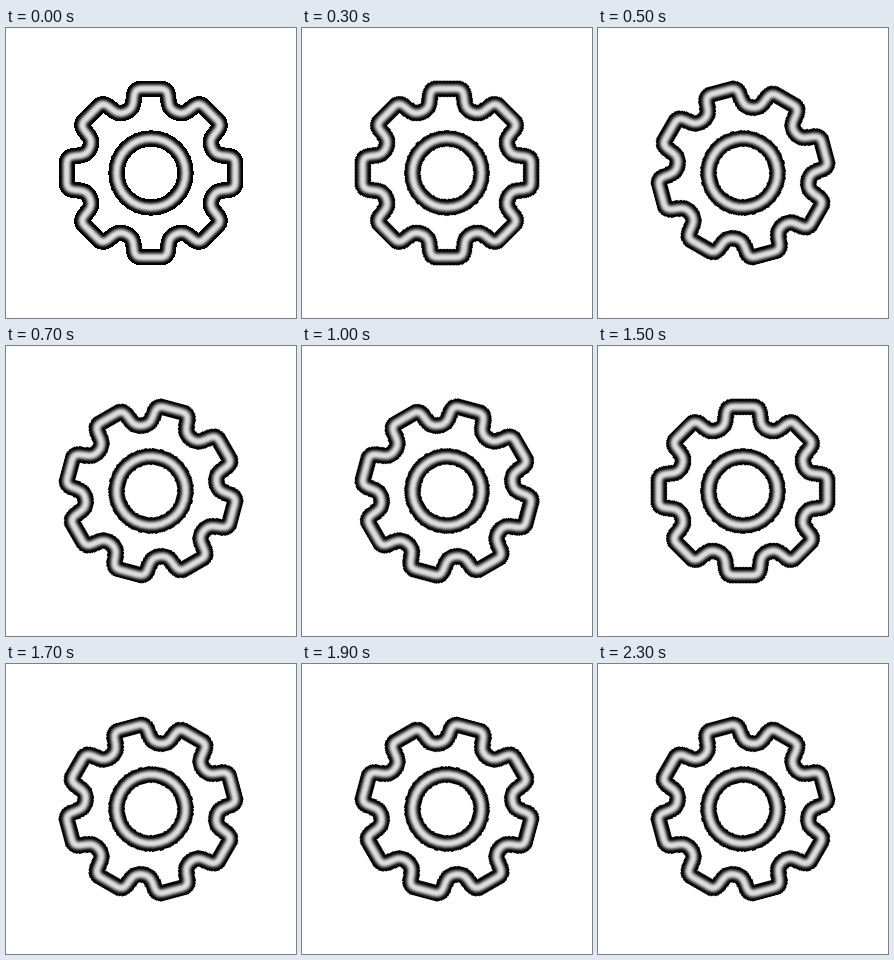
Recreate the animation shown at these times as an HTML page. Size 290 by 290 pixels, loop 2400 ms.

```html
<!DOCTYPE html>
<html lang="en">
<head>
<meta charset="utf-8">
<title>Turning gear</title>
<style>
  html, body { margin: 0; width: 100%; height: 100%; overflow: hidden; background: #fff; }
  svg { display: block; width: 100vw; height: 100vh; }
  #gear { animation: turn 2400ms steps(24) infinite; transform-origin: 0 0; }
  #layers { fill: none; stroke-linejoin: round; }
  @keyframes turn { from { transform: rotate(0deg); } to { transform: rotate(360deg); } }
</style>
</head>
<body>
<svg viewBox="-145 -145 290 290">
  <clipPath id="box"><rect x="-91.5" y="-91.5" width="183" height="183"/></clipPath>
  <g id="gear"><g id="layers" clip-path="url(#box)"></g></g>
</svg>
<script>
  const TEETH = 8, ROUNDING = 7, HALF_WIDTH = 8.2, CORE_GREY = 222, RING = 34.5;
  const TOOTH = [[-18.5, -63.8], [-16, -84.3], [16, -84.3], [18.5, -63.8]];

  const rotate = ([x, y], a) => [
    x * Math.cos(a) - y * Math.sin(a),
    x * Math.sin(a) + y * Math.cos(a)
  ];

  // Point at a fixed distance from p on the way to q
  function toward(p, q, dist) {
    const k = dist / Math.hypot(q[0] - p[0], q[1] - p[1]);
    return [p[0] + (q[0] - p[0]) * k, p[1] + (q[1] - p[1]) * k];
  }

  function roundedPath(points) {
    const n = points.length;
    const parts = points.map((p, i) => {
      const start = toward(p, points[(i + n - 1) % n], ROUNDING);
      const end = toward(p, points[(i + 1) % n], ROUNDING);
      return `${i ? 'L' : 'M'}${start} Q${p} ${end}`;
    });
    return parts.join(' ') + 'Z';
  }

  // Light near the centre line, black towards the rim
  function shade(dist) {
    const t = Math.min(1, Math.max(0, (dist - 1) / 6));
    return Math.round(CORE_GREY * (1 - t * t * (3 - 2 * t)));
  }

  const corners = [];
  for (let i = 0; i < TEETH; i++) {
    corners.push(...TOOTH.map(p => rotate(p, i * 2 * Math.PI / TEETH)));
  }
  const ring = `M${-RING} 0A${RING} ${RING} 0 1 1 ${RING} 0A${RING} ${RING} 0 1 1 ${-RING} 0Z`;
  const outline = roundedPath(corners) + ring;

  // Stacked strokes, widest first
  const layers = document.getElementById('layers');
  for (let d = HALF_WIDTH; d > 0; d -= 0.5) {
    const grey = shade(d);
    const path = document.createElementNS('http://www.w3.org/2000/svg', 'path');
    path.setAttribute('d', outline);
    path.setAttribute('stroke', `rgb(${grey},${grey},${grey})`);
    path.setAttribute('stroke-width', d * 2);
    if (d === HALF_WIDTH) path.setAttribute('shape-rendering', 'crispEdges');
    layers.append(path);
  }
</script>
</body>
</html>
```
